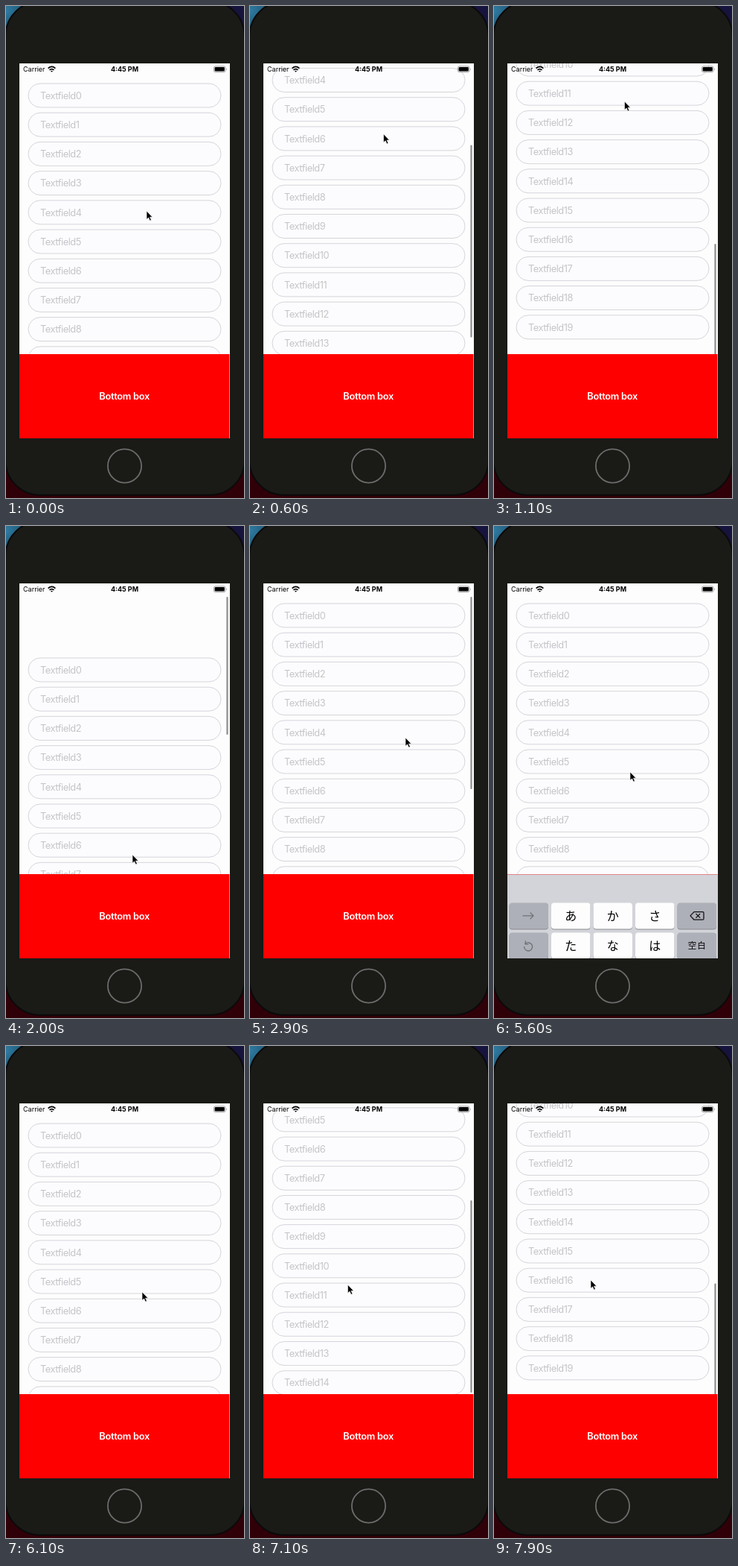
Recreate the animation shown at these times as an HTML page. Size 320 by 660 pixels, loop 8000 ms.

```html
<!DOCTYPE html>
<html lang="en">
<head>
<meta charset="utf-8">
<title>Scrolling form</title>
<style>
html, body { margin: 0; width: 100%; height: 100%; overflow: hidden; background: #000; }
svg { display: block; width: 320px; height: 660px; font-family: Inter, Roboto, sans-serif; }
.field rect { fill: #fcfcfe; stroke: #d5d5dc; }
.field text { font-size: 12.8px; letter-spacing: -.45px; fill: #c5c5c9; }
.key { font-family: "Noto Sans CJK JP", "Noto Sans CJK", sans-serif; text-anchor: middle; }
.line { fill: none; stroke: #111; stroke-width: 1.3; stroke-linecap: round; stroke-linejoin: round; }
</style>
</head>
<body>
<svg viewBox="0 0 320 660">
  <defs>
    <radialGradient id="blue" gradientUnits="userSpaceOnUse" cx="0" cy="6" r="30">
      <stop offset="0" stop-color="#2f7ba3"/>
      <stop offset=".6" stop-color="#24607f"/>
      <stop offset="1" stop-color="#0a1020"/>
    </radialGradient>
    <clipPath id="screen"><rect x="18" y="77" width="283" height="503"/></clipPath>
  </defs>
  <rect width="320" height="660" fill="#16133c"/>
  <rect y="615" width="320" height="45" fill="#300008"/>
  <rect width="50" height="50" fill="url(#blue)"/>
  <rect x="-.5" y="-6" width="321" height="662" rx="46" fill="#1a1a17" stroke="#0a0a0a" stroke-width="2"/>
  <circle cx="159.5" cy="617" r="22.6" fill="none" stroke="#6c6c6c" stroke-width="1.8"/>
  <g clip-path="url(#screen)">
    <rect x="18" y="77" width="283" height="503" fill="#fdfdfd"/>
    <g id="list"></g>
    <rect id="bar" x="296.4" width="2.2" rx="1.1" fill="#8c8c8c"/>
    <rect x="18" y="467" width="282.5" height="113" fill="#f00"/>
    <text x="159.2" y="528" text-anchor="middle" font-size="12.8" font-weight="600" letter-spacing="-.27" fill="#fff">Bottom box</text>
    <g font-size="9" fill="#000">
      <text x="23" y="88">Carrier</text>
      <text x="159.5" y="88" text-anchor="middle" font-weight="700">4:45 PM</text>
    </g>
    <g fill="none" stroke="#000" stroke-width="1.7">
      <path d="M56.6 83.6q4.9-4.4 9.8 0M58.5 85.9q3-2.6 6 0"/>
      <path d="M61.5 88.8l-1.5-1.6q1.5-1 3 0z" fill="#000" stroke="none"/>
    </g>
    <rect x="279.4" y="80.9" width="15.6" height="7.8" rx="2.2" fill="none" stroke="#8a8a8a" stroke-width=".8"/>
    <rect x="280.6" y="82.1" width="13.2" height="5.4" rx="1.2"/>
    <path d="M296 83.4q1.6 1.4 0 2.8z" fill="#8a8a8a"/>
    <g id="keyboard">
      <rect x="18" y="385" width="283" height="196" fill="#d2d4d9"/>
      <g id="keys"></g>
      <g class="line">
        <path d="M39 440.5h14m-4-4l4 4l-4 4" stroke="#6f7074"/>
        <path d="M42.2 478.2a5.5 5.5 0 1 1-1.6 3.9M42.4 474.6l-.4 3.8l3.8.4" stroke="#6f7074"/>
        <path d="M264 440.5l5-5.3h11.5q1.5 0 1.5 1.5v7.6q0 1.5-1.5 1.5H269zM271.8 438l5 5m0-5l-5 5"/>
        <g stroke-width="1.1">
          <circle cx="32.6" cy="560.5" r="7.2"/>
          <ellipse cx="32.6" cy="560.5" rx="3.3" ry="7.2"/>
          <path d="M32.6 553.3v14.4M25.4 560.5h14.4M27 556.5h11.2M27 564.5h11.2"/>
        </g>
        <rect x="58.8" y="553" width="4.6" height="9.5" rx="2.3"/>
        <path d="M56.6 559.5q0 5.2 4.5 5.2t4.5-5.2M61.1 564.8v3M58.5 567.8h5.2"/>
        <path d="M162 571.5h7M100 565.5h6"/>
      </g>
    </g>
  </g>
  <path id="pointer" d="M0 0v11.2l2.6-2.3l1.9 4.2l1.9-.8l-1.9-4.1h3.4z" stroke="#fff" stroke-width=".6"/>
</svg>
<script>
const LOOP = 8000, FIELDS = 20, PITCH = 39.2, KEYBOARD_HEIGHT = 196;
const $ = id => document.getElementById(id);

function add(parent, tag, attrs, text = '') {
  const node = document.createElementNS('http://www.w3.org/2000/svg', tag);
  for (const name in attrs) node.setAttribute(name, attrs[name]);
  node.textContent = text;
  return parent.appendChild(node);
}

for (let i = 0; i < FIELDS; i++) {
  const field = add($('list'), 'g', { class: 'field' });
  const y = 104 + i * PITCH;
  add(field, 'rect', { x: 30, y, width: 259, height: 32, rx: 16 });
  add(field, 'text', { x: 46, y: y + 20.7 }, 'Textfield' + i);
}
const caret = add($('list'), 'rect', { x: 45, y: 268.5, width: 1.8, height: 17, fill: '#3c7fb8' });

// Columns and rows are grid units
function key(col, row, label = '', { size = 16, gray = false, width = 52.5, height = 35, spacing = 0 } = {}) {
  const x = 20.5 + col * 56.5, y = 423 + row * 40.1;
  const box = { x, width, height, rx: 4 };
  add($('keys'), 'rect', { ...box, y: y + 1, fill: '#898b90' });
  add($('keys'), 'rect', { ...box, y, fill: gray ? '#adb0b8' : '#fdfdfd' });
  add($('keys'), 'text', {
    class: 'key', x: x + (width + spacing) / 2, y: y + height / 2 + size * .36,
    'font-size': size, 'font-weight': 500, 'letter-spacing': spacing
  }, label);
}
['あかさ', 'たなは', 'まやら'].forEach((chars, row) =>
  [...chars].forEach((char, i) => key(i + 1, row, char)));
key(1, 3, '^^', { size: 13 });
key(2, 3, 'わ');
key(3, 3, '､｡?!', { size: 15 });
const gray = true;
key(0, 0, '', { gray });
key(0, 1, '', { gray });
key(0, 2, 'ABC', { gray, size: 12 });
key(0, 3, '', { gray, width: 24.5 });
key(.505, 3, '', { gray, width: 24 });
key(4, 0, '', { gray });
key(4, 1, '空白', { gray, size: 11.5, spacing: 1 });
key(4, 2, '改行', { gray, size: 11.5, spacing: 1, height: 75.1 });

// Each row: time, then values; values ease between rows
const tracks = {
  pointer: [[0, 189, 275], [250, 189, 275], [800, 175.5, 128], [1150, 175.5, 128], [1950, 170, 441],
    [2050, 170, 441], [2800, 209, 284], [3500, 209, 284], [3700, 209, 279], [4700, 209, 279],
    [5400, 183, 330], [6300, 183, 330], [6600, 150, 400], [7200, 130, 314], [LOOP, 130, 314]],
  scroll: [[0, 0], [250, 0], [1050, 434], [1200, 434], [2000, -73], [2050, -73], [2700, 0],
    [6600, 0], [7600, 433], [LOOP, 433]],
  bar: [[0, 0], [250, 0], [350, 1], [4700, 1], [5100, 0], [6600, 0], [6700, 1], [LOOP, 1]],
  keyboard: [[0, 0], [3650, 0], [4100, 1], [5400, 1], [5850, 0], [LOOP, 0]]
};

function at(track, t) {
  const i = track.findIndex(row => row[0] > t);
  const a = track[i - 1], b = track[i];
  const u = (t - a[0]) / (b[0] - a[0]), e = u * u * (3 - 2 * u);
  return a.slice(1).map((v, n) => v + (b[n + 1] - v) * e);
}

function draw(now) {
  const t = now % LOOP;
  const [x, y] = at(tracks.pointer, t);
  const [scroll] = at(tracks.scroll, t);
  const [shown] = at(tracks.keyboard, t);
  $('pointer').setAttribute('transform', `translate(${x} ${y})`);
  $('list').setAttribute('transform', `translate(0 ${-scroll})`);
  $('keyboard').setAttribute('transform', `translate(0 ${(1 - shown) * KEYBOARD_HEIGHT})`);
  $('bar').setAttribute('y', 95 + Math.max(0, scroll) * .516);
  $('bar').setAttribute('height', 258 + Math.min(0, scroll) - 132 * shown);
  $('bar').setAttribute('opacity', at(tracks.bar, t)[0]);
  const focused = t > 3700 && t < 5500;
  caret.setAttribute('opacity', focused && (t - 3700) % 1100 < 950 ? 1 : 0);
}

const start = performance.now();
function tick() {
  draw(performance.now() - start);
  requestAnimationFrame(tick);
}
tick();
</script>
</body>
</html>
```
